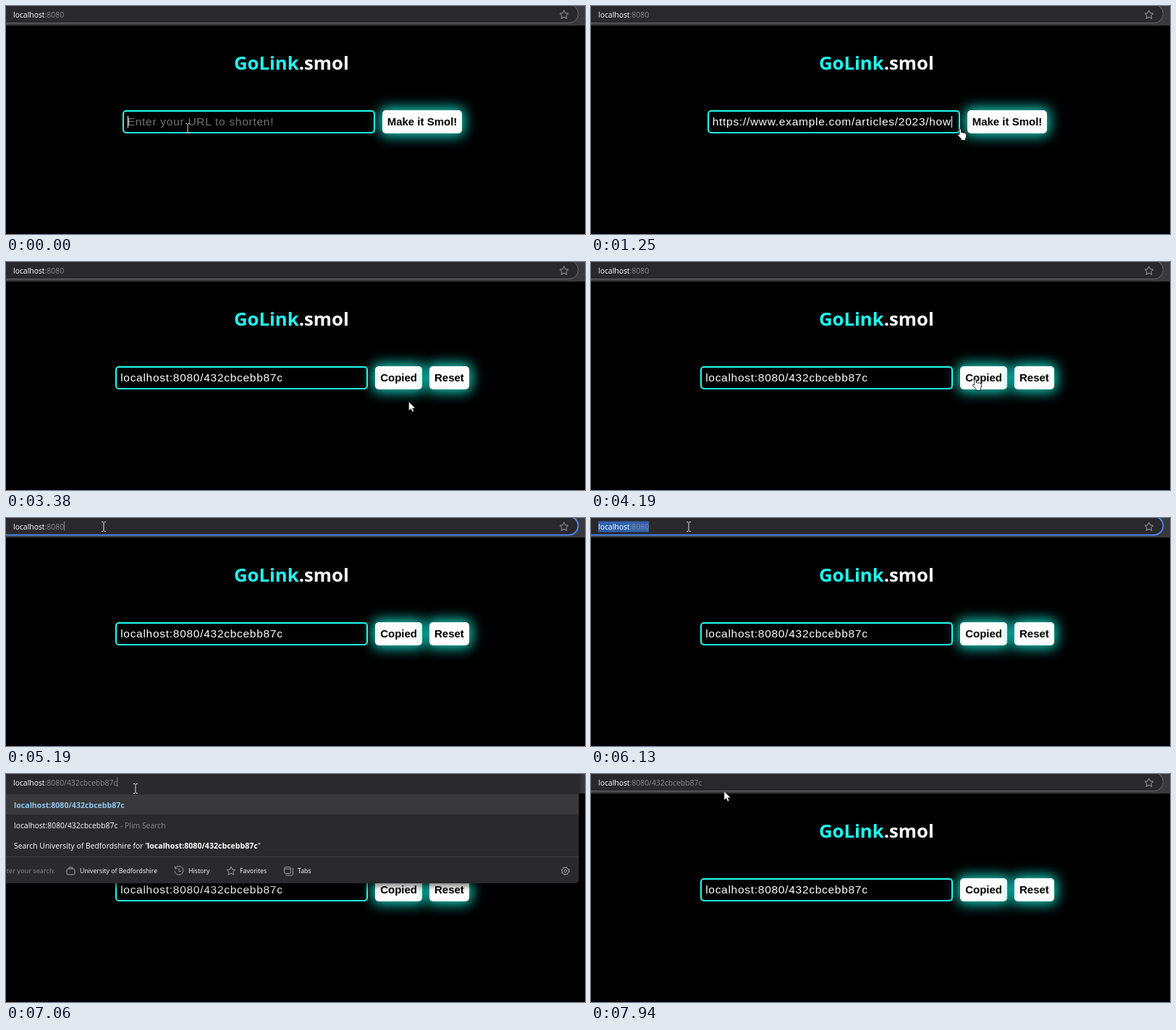
These frames come from a looping animation (800x315 px, 8000 ms). An HTML page:

```html
<!DOCTYPE html>
<html lang="en">
<head>
<meta charset="utf-8">
<title>Link shortener</title>
<style>
html, body { margin: 0; width: 100%; height: 100%; overflow: hidden; background: #000; }
svg { position: absolute; left: 0; top: 0; width: 800px; height: 315px; }
text { font: 10.4px "Open Sans", "Noto Sans", sans-serif; fill: #fff; white-space: pre; }
.title { font-size: 25.7px; font-weight: 700; }
.bold { font-size: 10.6px; font-weight: 700; }
.small { font-size: 8.8px; }
.dim { fill: #8c8c8e; }
.match { fill: #8cc8f2; }
.icon { fill: none; stroke: #a0a0a2; }
#form {
  position: absolute; left: 0; top: 144px; width: 791px; height: 32px;
  display: flex; justify-content: center; gap: 10px;
  font: 15px/32px "Liberation Sans", Arial, sans-serif;
}
#field {
  box-sizing: border-box; width: 349px; height: 32px; padding-left: 5px;
  border: 2px solid #1ffff4; border-radius: 5px; line-height: 28px;
  font-size: 15.5px; letter-spacing: .72px; color: #fff; white-space: pre; overflow: hidden;
}
#field.empty { color: #757575; }
#caret { display: inline-block; width: 1px; height: 16px; margin-right: -1px; vertical-align: -3px; background: #fff; }
.button {
  padding: 0 7px; border-radius: 5px; background: #fff; color: #000; font-weight: 700;
  white-space: nowrap; box-shadow: 0 0 18px 3px #12dfcc;
}
</style>
</head>
<body>
<svg>
  <text class="title" x="315" y="88"><tspan fill="#20fff6">GoLink</tspan>.smol</text>
</svg>
<div id="form">
  <div id="field"></div>
  <div class="button" id="main"></div>
  <div class="button" id="reset">Reset</div>
</div>
<svg>
  <defs>
    <path id="star" d="M0-6 1.8-2.1 6-1.7 2.9 1.2 3.8 5.4 0 3.2-3.8 5.4-2.9 1.2-6-1.7-1.8-2.1Z" stroke-linejoin="round"/>
  </defs>
  <rect width="800" height="27" fill="#3a393c"/>
  <rect id="bar" x="-30" y="-2" width="820.5" height="25.5" rx="12.7" fill="#29282b"/>
  <use href="#star" x="771" y="12" class="icon"/>

  <g id="panel">
    <rect id="backdrop" x="-20" y="-20" width="811.5" height="171" rx="5" fill="#2a292b" style="filter: drop-shadow(0 4px 5px #0008)"/>
    <rect width="791.5" height="27" fill="#2a292b"/>
    <rect id="highlight" width="791.5" height="28" fill="#fff" opacity=".07"/>
    <g id="entries">
      <path d="M0 114.5H791.5" stroke="#414143"/>
      <text class="bold match" x="11" y="46.5">localhost:8080/432cbcebb87c</text>
      <text x="11" y="74.5">localhost:8080/432cbcebb87c</text>
      <text class="dim" x="158" y="74.5">- Plim Search</text>
      <text x="11" y="103">Search University of Bedfordshire for "</text>
      <text x="195" y="103"><tspan class="bold">localhost:8080/432cbcebb87c</tspan>"</text>
      <text class="dim" x="68" y="137" text-anchor="end" style="font-size:9.2px">Filter your search:</text>
      <text class="small" x="102" y="137">University of Bedfordshire</text>
      <text class="small" x="252" y="137">History</text>
      <text class="small" x="323" y="137">Favorites</text>
      <text class="small" x="403" y="137">Tabs</text>
      <g class="icon">
        <rect x="84" y="131" width="11" height="8" rx="2"/>
        <path d="M87 131v-2h5v2"/>
        <path d="M234 130a6 6 0 1 1-1 4M233.5 127.5v3h3M239 130.5v4h3"/>
        <use href="#star" x="311" y="134"/>
        <rect x="384.5" y="128.5" width="9" height="9" rx="2"/>
        <path d="M396.5 130v8q0 2-2 2h-8M385 131h8"/>
        <circle cx="773" cy="134" r="1.8"/>
        <circle cx="773" cy="134" r="4.5"/>
        <circle cx="773" cy="134" r="5.5" stroke-dasharray="2.2 2.12"/>
      </g>
    </g>
  </g>

  <rect id="selection" x="10" y="4.5" width="70" height="15" fill="#2f62ad"/>
  <text id="url" x="10" y="15.5">localhost<tspan id="path" class="dim"></tspan></text>
  <path id="urlCaret" d="M0 4.500v13" stroke="#8c8c8e"/>

  <g id="cursor">
    <path id="beam" d="M-3-6.500H-1L0-5.500 1-6.500H3M0-5.500V5.500M-3 6.500H-1L0 5.500 1 6.500H3" fill="none" stroke="#e4e4e4"/>
    <path id="hand" d="M-1.300 1.500Q0 0 1.300 1.500V6Q3 4.800 4 6.300 5.500 5.300 6.400 6.900 8.300 6.300 8.300 8.500V11Q8.300 13 7 14.500V16.500H1V14.500L-3.500 9.500Q-4 7.500-1.300 8.700Z" fill="#fff" stroke="#222"/>
    <path id="arrow" d="M0 0V12L2.800 9.500 4.800 13.800 6.800 12.900 4.900 8.700H8.800Z" fill="#fff" stroke="#222" stroke-width=".5"/>
  </g>
</svg>
<script>
const $ = id => document.getElementById(id);
const show = (id, on) => $(id).style.display = on ? "" : "none";
const LOOP = 8000, SLUG = "432cbcebb87c";
const LONG_URL = "https://www.example.com/articles/2023/how";

// When things happen, in ms
const PASTE = 500, SHORTEN = 1800, COPY = 2580, FOCUS = 5150, SELECT = 5300,
      PASTE_URL = 6380, OPEN = 6400, ENTER = 7420;

// Cursor hot spot: time, x, y
const route = [
  [0, 251, 169], [800, 251, 169], [1450, 585, 169], [1950, 585, 167],
  [2350, 566, 161], [2700, 566, 161], [3200, 563, 174], [3650, 545, 228],
  [4100, 531, 161], [4300, 531, 161], [5060, 135, 12], [6500, 135, 12],
  [6950, 179, 20], [7450, 179, 20], [7750, 184, 24], [8000, 184, 24]
];

function cursorAt(t) {
  const i = route.findIndex(p => p[0] > t);
  const [t0, x0, y0] = route[i - 1], [t1, x1, y1] = route[i];
  const p = (t - t0) / (t1 - t0), e = p * p * (3 - 2 * p);
  return [x0 + (x1 - x0) * e, y0 + (y1 - y0) * e];
}

function cursorShape(x, y) {
  if (y < 23) return "beam";
  if (y < 145 || y > 176 || x < 151 || x > 640) return "arrow";
  return x < 510 ? "beam" : "hand";
}

let formState = "";
function drawForm(t) {
  const caret = t < SHORTEN && t % 1060 < 530;
  const state = [t < PASTE, t < SHORTEN, t < COPY, caret].join();
  if (state === formState) return;
  formState = state;
  const text = t < PASTE ? "Enter your URL to shorten!"
    : t < SHORTEN ? LONG_URL : "localhost:8080/" + SLUG;
  const mark = caret ? '<i id="caret"></i>' : "";
  $("field").innerHTML = t < PASTE ? mark + text : text + mark;
  $("field").className = t < PASTE ? "empty" : "";
  $("main").textContent = t < SHORTEN ? "Make it Smol!" : t < COPY ? "Copy" : "Copied";
  show("reset", t >= SHORTEN);
}

function drawBrowser(t) {
  const focused = t >= FOCUS && t < ENTER;
  const selected = t >= SELECT && t < PASTE_URL;
  $("bar").setAttribute("stroke", focused ? "#4a86ea" : "#6a696c");
  $("bar").setAttribute("stroke-width", focused ? 2 : 1);
  $("path").textContent = ":8080" + (t >= PASTE_URL ? "/" + SLUG : "");
  show("selection", selected);
  show("urlCaret", focused && !selected);
  $("urlCaret").setAttribute("transform", `translate(${$("url").getComputedTextLength() + 10.5})`);

  // The entries come in ahead of the backdrop
  const p = Math.min(1, Math.max(0, (t - OPEN) / 120));
  show("panel", p > 0 && t < ENTER);
  $("backdrop").style.opacity = 1 - (1 - p) ** 3;
  $("entries").style.opacity = 1 - (1 - p) ** 5;
  $("highlight").setAttribute("y", p < .7 ? 56 : 28);
}

function draw(now) {
  const t = now % LOOP;
  drawForm(t);
  drawBrowser(t);
  const [x, y] = cursorAt(t), shape = cursorShape(x, y);
  for (const id of ["beam", "hand", "arrow"]) show(id, id === shape);
  $("cursor").setAttribute("transform", `translate(${x} ${y})`);
}

const start = performance.now();
function tick() {
  draw(performance.now() - start);
  requestAnimationFrame(tick);
}
tick();
</script>
</body>
</html>
```
